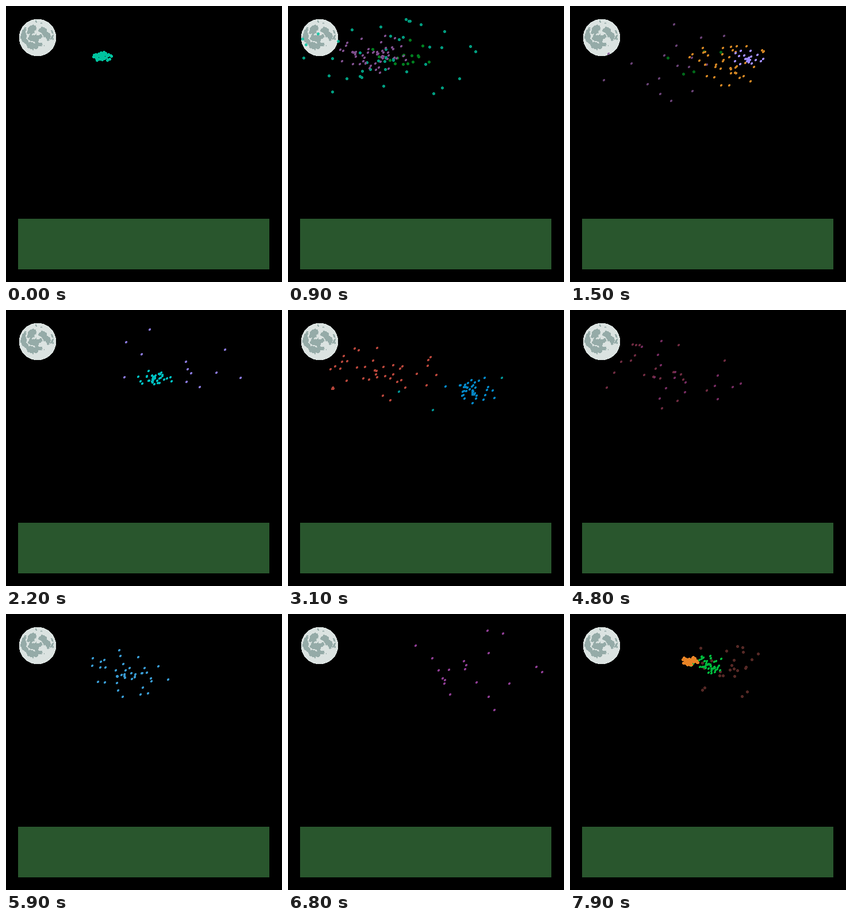
Animation of 480x480 px, one loop 8 s. Source, as an HTML page:

```html
<!DOCTYPE html>
<html lang="en">
<head>
<meta charset="utf-8">
<title>Fireworks</title>
<style>
  html, body { margin: 0; width: 100%; height: 100%; overflow: hidden; background: #000; }
  svg { display: block; width: 100%; height: 100%; }
</style>
</head>
<body>
<svg viewBox="0 0 480 480" shape-rendering="crispEdges">
  <filter id="rough" color-interpolation-filters="sRGB">
    <feTurbulence type="fractalNoise" baseFrequency="0.25" numOctaves="2" seed="4"/>
    <feDisplacementMap in="SourceGraphic" scale="5" xChannelSelector="R" yChannelSelector="G"/>
  </filter>
  <circle cx="55" cy="55" r="32.4" fill="#dbe3e1"/>
  <g fill="#95aba8" filter="url(#rough)">
    <path d="M27 46l3-6 3-2 3 3-2 6 2 4-1 6 4 4 2 6-5 1-7-5-4-9z"/>
    <path d="M38 38l6-5 8 1 0 6-3 6-6 4-6-2z"/>
    <path d="M40 51l5-2 4 3 3-4 4 3 6-2 1 5-5 4-1 6-6 1-4-5-5 1-3-4z"/>
    <path d="M58 38l6-2 6 4 1 5 6 3 1 6-2 6-5 1-1-6-6-3-1-4-6-4z"/>
    <path d="M78 41l3 2 2 6-4-2zM79 52l4-1-1 6-4 3z"/>
    <path d="M36 65l7-3 6 3 7-1 7 0 1 4-7 2-4 4-7 2-6-3-5-3z"/>
    <path d="M66 69l3-1-3 5zM51 26h3v2h-3zM60 29h3v2h-3z"/>
  </g>
  <rect x="21" y="370" width="437" height="88" fill="#29562d"/>
  <g id="bursts" fill="none" stroke-linecap="round"></g>
</svg>
<script>
const LOOP = 8000, STEP = 100;
const SPEED = 16, FLATTEN = 0.53, MAX_LIFE = 12, FADE = 22;
const EDGE = 22, FAR_EDGE = 457;
const layer = document.getElementById('bursts');

let seed = 20;
function random() {
  seed = (seed * 1664525 + 1013904223) % 4294967296;
  return seed / 4294967296;
}

// Speeds are in pixels per step, lives in steps.
function makeSpark(minLife) {
  const angle = random() * 2 * Math.PI;
  const speed = SPEED * random();
  return {
    vx: speed * Math.cos(angle),
    vy: speed * Math.sin(angle) * FLATTEN,
    life: minLife + random() * (MAX_LIFE - minLife)
  };
}

const bursts = [];
function burst(start, x, y, color, { size = 4, count = 40, minLife = 7 } = {}) {
  const path = document.createElementNS('http://www.w3.org/2000/svg', 'path');
  path.setAttribute('stroke', color);
  path.setAttribute('stroke-width', size);
  layer.append(path);
  const offset = size % 2 / 2; // centres odd dots on a pixel
  const sparks = Array.from({ length: count }, () => makeSpark(minLife));
  bursts.push({ start, x, y, offset, sparks, path });
}

burst(-100, 167, 88, '#00c4a0', { size: 5, count: 46, minLife: 10 });
burst(500, 203, 90, '#00801f', { size: 5, count: 16 });
burst(500, 150, 83, '#80508f', { count: 56 });
burst(1000, 275, 105, '#d88a24');
burst(1300, 310, 90, '#9f8cff', { count: 22 });
burst(2000, 260, 119, '#00bfc0', { count: 34 });
burst(2400, 155, 105, '#c84c40');
burst(2800, 320, 140, '#0587c6');
burst(3400, 173, 112, '#f361bb', { count: 46 });
burst(3400, 305, 100, '#988008', { size: 5, count: 46 });
burst(4000, 178, 108, '#82306b', { count: 22 });
burst(4000, 180, 108, '#7c3048', { count: 22 });
burst(5400, 205, 105, '#3aa0d8');
burst(5900, 305, 98, '#a748ac', { count: 28 });
burst(7300, 285, 98, '#5c2c28', { size: 5, count: 25 });
burst(7700, 238, 88, '#00b83c');
burst(7800, 210, 82, '#e98426', { size: 5, count: 46 });

const inside = v => v >= EDGE && v <= FAR_EDGE;

function draw(time) {
  const now = Math.floor(time / STEP) * STEP;
  for (const { start, x, y, offset, sparks, path } of bursts) {
    const age = (now - start) / STEP;
    let d = '';
    if (age > 0) {
      for (const { vx, vy, life } of sparks) {
        const px = Math.round(x + vx * age) + offset;
        const py = Math.round(y + vy * age) + offset;
        if (age < life && inside(px) && inside(py)) d += `M${px} ${py}h0`;
      }
    }
    path.setAttribute('d', d);
    path.setAttribute('opacity', Math.max(0, 1 - (age / FADE) ** 2));
  }
}

const begin = performance.now();
function tick() {
  draw((performance.now() - begin) % LOOP);
  requestAnimationFrame(tick);
}
tick();
</script>
</body>
</html>
```
